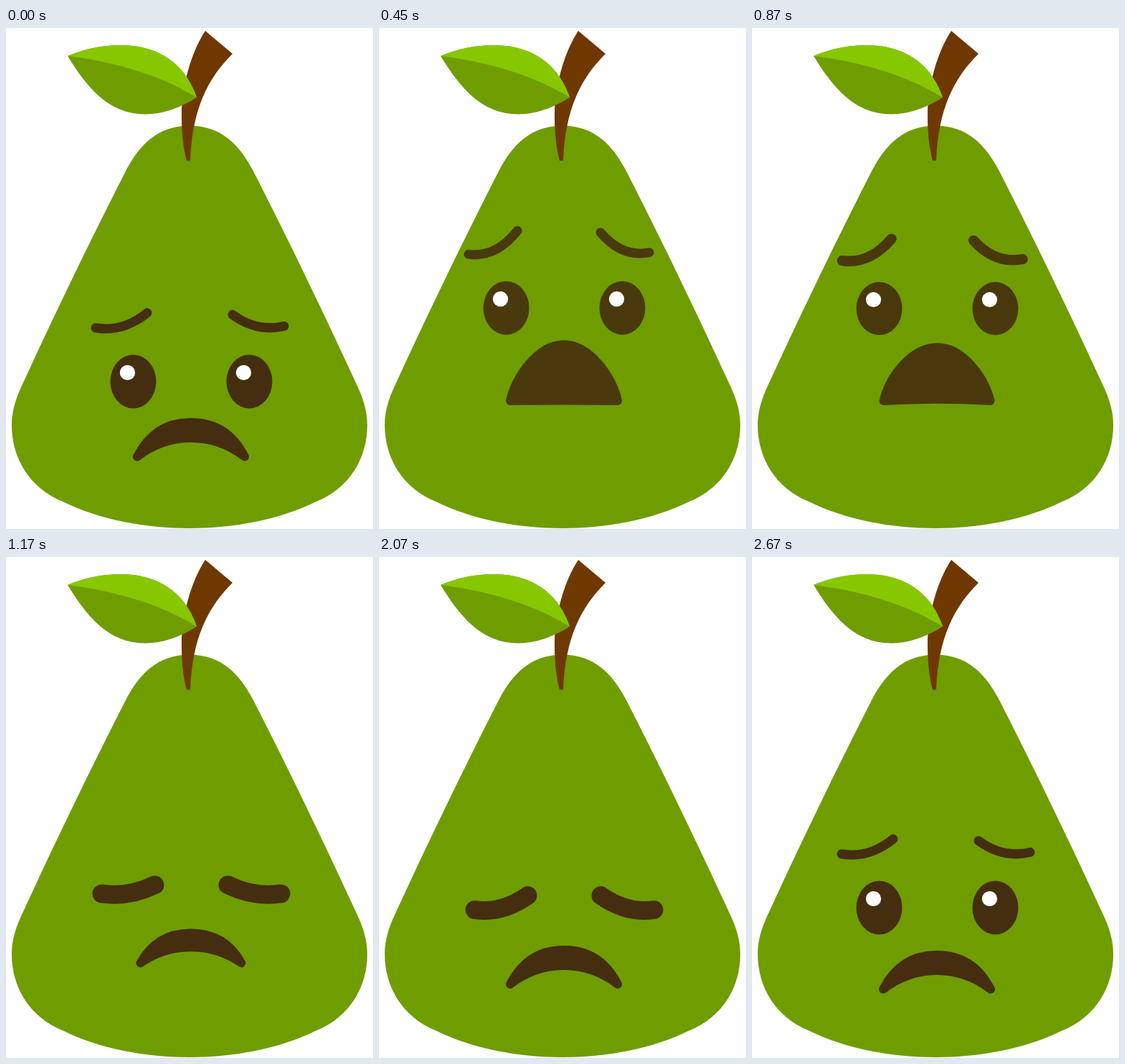
An HTML page for the animation above (2700 ms loop, 512x700 px).

```html
<!DOCTYPE html>
<html lang="en">
<head>
<meta charset="utf-8">
<title>Sad pear</title>
<style>
  html, body { margin: 0; width: 100%; height: 100%; overflow: hidden; background: #fff; }
  svg { display: block; width: 100%; height: 100%; }
</style>
</head>
<body>
<svg viewBox="0 0 512 700">
  <defs>
    <path id="half" d="M254 136.500H256C300 136.500 326 163 345 200C397 302 445 402 491 502C500 522 504 538 504 555C504 600 480 643 432 662C382 687 316 699 256 699H254Z"/>
    <g id="eye"><ellipse rx="32" ry="37.500"/><circle cx="-8" cy="-12.500" r="10.600" fill="#fff"/></g>
  </defs>
  <g fill="#6f9d00">
    <use href="#half"/>
    <use href="#half" transform="translate(512) scale(-1 1)"/>
  </g>
  <path fill="#6f3800" d="M278 4L316 36C282 70 260 112 257 185.500H252C248 170 245 150 245 125C244 85 258 34 278 4Z"/>
  <path fill="#6f9d00" d="M86 39C110 29 135 24 160 24C206 24 248 44 266 97C246 110 222 120 195 120.500C143 121 112 82 86 39Z"/>
  <path fill="#87c700" d="M86 39C110 29 135 24 160 24C206 24 248 44 266 97C215 66 155 48 86 39Z"/>
  <g id="face" stroke-linecap="round" stroke-linejoin="round">
    <use id="eyeL" href="#eye"/>
    <use id="eyeR" href="#eye"/>
    <path id="brows" fill="none"/>
    <path id="mouth" stroke-width="12"/>
  </g>
</svg>
<script>
const LOOP = 2700, STEP = 30, CX = 258;
const $ = id => document.getElementById(id);
const face = $('face'), brows = $('brows'), mouth = $('mouth');

const mix = (a, b, u) => a + (b - a) * u;
const span = (t, from, to) => Math.min(1, Math.max(0, (t - from) / (to - from)));
const smooth = (t, from, to) => {
  const u = span(t, from, to);
  return u * u * (3 - 2 * u);
};
const easeOut = (t, from, to) => 1 - (1 - span(t, from, to)) ** 2;

function drawEye(id, x, y, open) {
  $(id).setAttribute('transform', `translate(${x} ${y}) scale(1 ${Math.max(open, 0.001)})`);
  $(id).setAttribute('visibility', open > 0.01 ? 'visible' : 'hidden');
}

function drawBrows(y, open, lid, press) {
  const axis = 256.5 - 5.5 * open + 2 * lid;
  const outer = 125 + 8.5 * lid;
  const length = 72 - 4 * open + 2 * lid;
  const rise = 21 + 12 * open - lid - 10 * press;
  const sag = 6.5 - 1.5 * open - lid;
  // the right brow mirrors the left one, a little flatter
  const arc = (place, tilt) =>
    `M${place(outer)} ${y - tilt}` +
    `Q${place(outer + 38)} ${y + sag} ${place(outer + length)} ${y - rise + tilt}`;
  brows.setAttribute('d', arc(x => x, 0) + arc(x => 2 * axis - x, 2.5 * (1 - lid)));
  brows.setAttribute('stroke-width', 13 + 13 * lid);
}

function drawMouth(y, open, press) {
  const half = 75 - 5.8 * press;
  const top = y - 48 - 31 * open + 7.7 * press;
  const under = y - 26 * (1 - open) + 5 * press;
  const a = half * mix(0.79, 0.91, open);
  const c = half * mix(0.47, 0.48, open);
  const d = half * 0.4;
  const side = mix(y, top, mix(0.65, 0.42, open));
  const low = (under - y / 4) / 0.75;
  mouth.setAttribute('d',
    `M${CX - half} ${y}C${CX - a} ${side} ${CX - c} ${top} ${CX} ${top}` +
    `S${CX + a} ${side} ${CX + half} ${y}` +
    `C${CX + d} ${low} ${CX - d} ${low} ${CX - half} ${y}Z`);
}

function render(t) {
  // gasp, sigh with closing eyes, settle, then wake
  const inhale = smooth(t, 0, 480);
  const sigh = smooth(t, 840, 1140);
  const close = smooth(t, 810, 1110);
  const settle = easeOut(t, 1110, 1620);
  const wake = smooth(t, 2130, 2340);
  const bob = Math.sin(Math.PI * smooth(t, 2250, 2670));

  const open = inhale - close;
  const lid = close - wake;
  const press = close * (1 - settle);
  const eyeY = 494 - 104 * inhale + 70 * sigh + 29 * settle + wake - 4 * bob;
  const lipY = 599 - 79 * inhale + 39 * sigh + 38 * settle + 7 * wake + 4.5 * bob;

  const ink = `rgb(${mix(69, 73, open)},${mix(45, 57, open)},${mix(15, 12, open)})`;
  face.setAttribute('fill', ink);
  face.setAttribute('stroke', 'none');
  brows.setAttribute('stroke', ink);
  mouth.setAttribute('stroke', ink);

  drawEye('eyeL', 177.5, eyeY, 1 - lid * lid);
  drawEye('eyeR', 339.5, eyeY, 1 - lid * lid);
  drawBrows(eyeY - 75 + 79 * lid, open, lid, press);
  drawMouth(lipY, open, press);
}

const start = performance.now();
function tick() {
  const t = (performance.now() - start) % LOOP;
  render(Math.floor(t / STEP) * STEP);
  requestAnimationFrame(tick);
}
tick();
</script>
</body>
</html>
```
